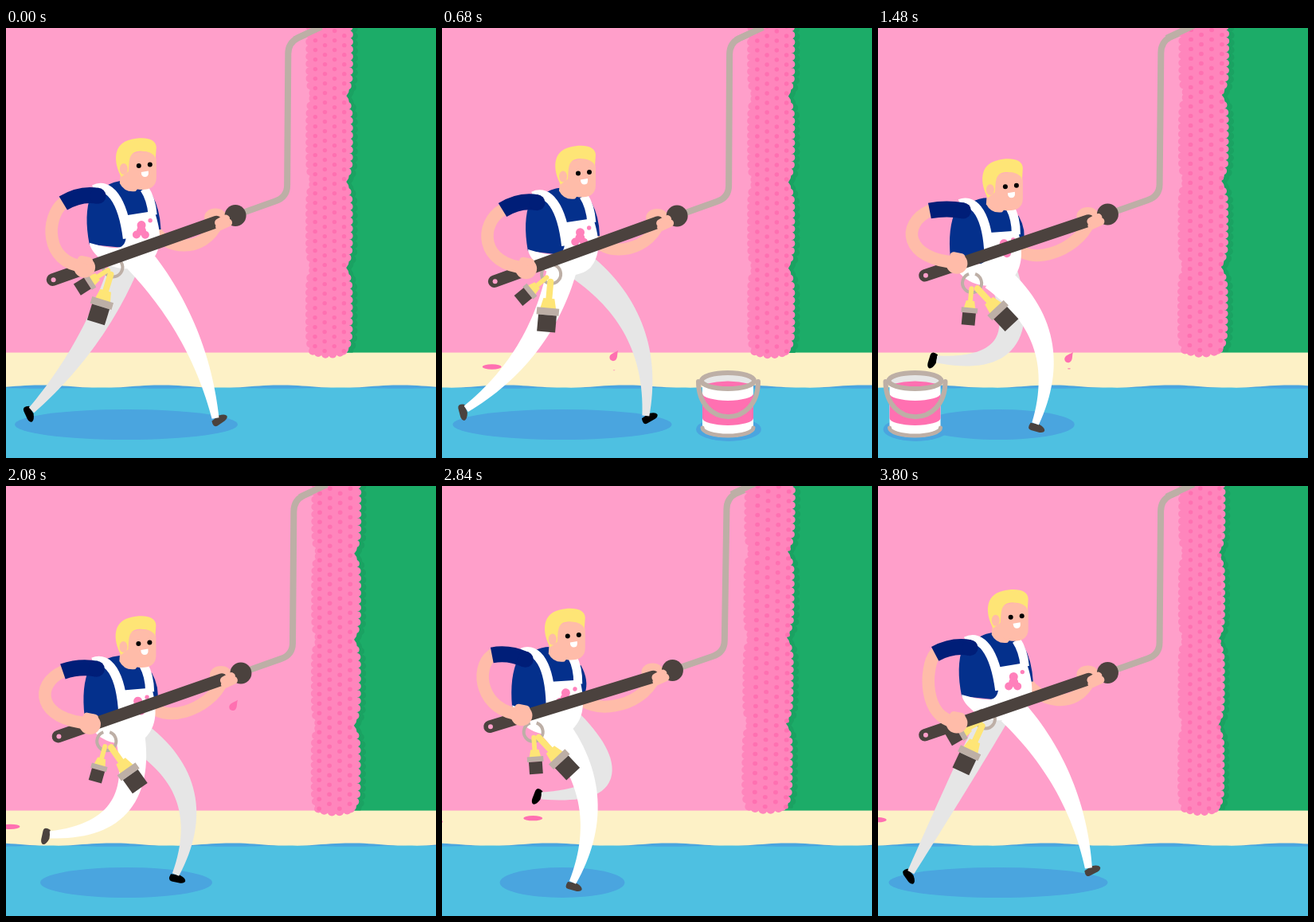
An HTML page with a canvas that plays this animation: 540 by 540 pixels, repeating every 3.84 s.

```html
<!DOCTYPE html>
<html lang="en">
<head>
<meta charset="utf-8">
<title>Painter</title>
<style>
html, body { margin: 0; width: 100%; height: 100%; overflow: hidden; }
canvas { display: block; width: 540px; height: 540px; }
</style>
</head>
<body>
<canvas id="stage" width="540" height="540"></canvas>
<script>
const ctx = document.getElementById('stage').getContext('2d');
const LOOP = 3840, STRIDE = 1280, STEP = 640, FRAME = 40, SPEED = 1500 / LOOP, TAU = Math.PI * 2;
const C = {
  wall: '#ff9fca', green: '#1cac68', greenShade: '#1aa262', floor: '#fdf1c6',
  cloth: '#4ec0e1', shade: '#4aa5df', paint: '#ff70b1', roller: '#ff85bc', blob: '#ff80bb',
  skin: '#ffbca9', hair: '#fee576', navy: '#04308c', sleeve: '#001e78',
  dark: '#4b423e', metal: '#bdafa6', grey: '#e6e6e6', white: '#fff', black: '#000'
};

// Evenly spaced key points: ankle x, y and shoe angle over a stride; eye height over a step
const FOOT = [
  [263, 490, -40], [213, 496, 6], [148, 498, 10], [92, 496, 20],
  [32, 488, 60], [55, 438, 97], [150, 392, 100], [242, 437, 20]
];
const EYE = [[173], [191], [198], [197], [178], [160], [152], [158]];
// Paint drops: landing time and place
const DROPS = [[500, 133], [693, 211], [1490, 236], [2195, 241], [2600, 208], [3372, 166]];

const rad = deg => deg * Math.PI / 180;
const clamp = v => Math.max(0, Math.min(1, v));
const osc = (t, period, peak) => Math.cos(TAU * (t - peak) / period);

// Smooth closed curve through evenly spaced points, turn = 1 is once round
function around(points, turn) {
  const n = points.length, pos = turn % 1 * n, i = Math.floor(pos), u = pos - i;
  const [a, b, c, d] = [-1, 0, 1, 2].map(k => points[(i + k + n) % n]);
  return b.map((v, j) => v + u / 2 * (c[j] - a[j] +
    u * (2 * a[j] - 5 * v + 4 * c[j] - d[j] + u * (3 * (v - c[j]) + d[j] - a[j]))));
}

function fill(d, color) {
  ctx.fillStyle = color;
  ctx.fill(new Path2D(d));
}
function line(d, color, width, cap = 'butt') {
  ctx.strokeStyle = color;
  ctx.lineWidth = width;
  ctx.lineCap = cap;
  ctx.lineJoin = 'round';
  ctx.stroke(new Path2D(d));
}
function oval(x, y, rx, color, ry = rx) {
  ctx.fillStyle = color;
  ctx.beginPath();
  ctx.ellipse(x, y, rx, ry, 0, 0, TAU);
  ctx.fill();
}
function rect(x, y, w, h, color) {
  ctx.fillStyle = color;
  ctx.fillRect(x, y, w, h);
}
function at(x, y, deg, draw) {
  ctx.save();
  ctx.translate(x, y);
  ctx.rotate(rad(deg));
  draw();
  ctx.restore();
}

function painterPose(t) {
  const tilt = 3.4 + 3 * osc(t, STEP, 270), drop = 74.5 + 8 * osc(t, STEP, 70);
  return {
    tilt, drop,
    x: 164 + 5 * osc(t, STEP, 0) + 2.5 * osc(t, STRIDE, 740),
    y: around(EYE, t / STEP)[0],
    tipX: 291.5 + 3.7 * osc(t, STRIDE, 720),
    tipY: 230 + (drop - 67) * 0.4,
    sleeveY: 35 + 12 * osc(t, STEP, 0),
    hipSpread: 3 + 15 * osc(t, STRIDE, 480),
    bigBrush: -9 + 37 * osc(t, STEP, 560),
    smallBrush: 28 + 32 * osc(t, STEP, 600)
  };
}

function drawGround(t, seam) {
  rect(0, 0, 540, 540, C.wall);
  rect(seam, 0, 540, 408, C.green);
  rect(0, 407.6, 540, 133, C.floor);
  const wave = (color, base, amp) => {
    let d = 'M0 540';
    for (let x = 0; x <= 540; x += 6) d += `L${x} ${base - amp * osc(x + SPEED * t, 150, 195)}`;
    fill(d + 'L540 540Z', color);
  };
  wave(C.shade, 450.2, 1.8);
  wave(C.cloth, 452.2, -0.6);
  oval(151, 498, 108 + 32 * osc(t, STEP, 0), C.shade, 19);
}

function drawDrops(t) {
  DROPS.forEach(([land, landX], i) => {
    const x = landX - SPEED * (t - land), y = 423.5 + 6.5 * osc(i, 6, 1.2);
    const fall = (t - land) / 520 + 1, grow = clamp((t - land + 20) / 60);
    if (grow > 0) oval(x, y, 12 * grow, C.paint, 3.2 * grow);
    if (fall > 0 && fall < 1) {
      at(x, -20 + (y + 20) * fall ** 1.6, 35, () =>
        fill('M0 -9C1 -5 4.5 -2 4.5 2A4.5 4.5 0 0 1 -4.5 2C-4.5 -2 -1 -5 0 -9Z', C.paint));
    }
  });
}

function rollerShape() {
  const shape = new Path2D();
  const bump = (x, y) => {
    shape.moveTo(x + 5, y);
    shape.arc(x, y, 5, 0, TAU);
  };
  for (let top = -260; top < 100; top += 108) {
    shape.roundRect(93, top, 49, 111, 9);
    for (let i = 0; i <= 11; i++) {
      const u = i / 5.5 - 1, inset = 7 * u ** 6, y = top + 5 + 9.2 * i;
      bump(93 + inset * 0.6, y);
      bump(142 - inset, y);
    }
  }
  for (let x = 104; x < 135; x += 9) bump(x, 175 - Math.abs(x - 117) * 0.2);
  return shape;
}
const ROLLER = rollerShape();

function drawRoller(t, p) {
  at(p.tipX, p.tipY, (82 - p.drop) * 0.05, () => {
    line('M8 -3L50 -18Q65 -23 65 -38L66 -203Q66 -217 78 -223L125 -244', C.metal, 8);
    ctx.translate(88, 0);
    ctx.scale(1 + p.tilt * 0.014, 1);
    ctx.translate(-88, 0);
    ctx.save();
    ctx.beginPath();
    ctx.rect(118, -300, 60, 472);
    ctx.clip();
    ctx.translate(6, 2);
    ctx.fillStyle = C.greenShade;
    ctx.fill(ROLLER);
    ctx.restore();
    ctx.fillStyle = C.roller;
    ctx.fill(ROLLER);
    const shift = 1488 / LOOP * t % 24;
    for (let col = 0; col < 8; col++) {
      const x = 88 + col * 12 - shift;
      if (x < 92 || x > 143) continue;
      for (let y = -250 + col % 2 * 6; y < 174; y += 12) oval(x, y, 2.7, C.paint);
    }
  });
  at(p.tipX, p.tipY, 0, () => line('M74 -221L78 -223L108 -237', C.metal, 8));
}

// The knee bows forward as hip and ankle come closer
function drawLeg(t, hipX, hipY, color, shoe, lift) {
  const [ax, footY, angle] = around(FOOT, t / STRIDE), ay = footY - lift;
  const dx = ax - hipX, dy = ay - hipY, dist = Math.hypot(dx, dy);
  const bow = 0.58 * Math.sqrt(Math.max(0, 228 ** 2 - dist ** 2)) / dist;
  const kx = (hipX + ax) / 2 + dy * bow, ky = (hipY + ay) / 2 - dx * bow;
  at(ax, ay, angle, () => fill('M-6 0L5 0Q13 3 13 7Q12 10 7 10L-4 9Q-10 8 -6 0Z', shoe));
  const left = [], right = [];
  for (let s = 0; s <= 1; s += 1 / 32) {
    const q = 1 - s;
    const x = q * q * hipX + 2 * q * s * kx + s * s * ax;
    const y = q * q * hipY + 2 * q * s * ky + s * s * ay;
    const vx = q * (kx - hipX) + s * (ax - kx), vy = q * (ky - hipY) + s * (ay - ky);
    const w = (18.5 - 14 * s ** 1.2) / Math.hypot(vx, vy);
    left.push([x - vy * w, y + vx * w]);
    right.unshift([x + vy * w, y - vx * w]);
  }
  fill('M' + left.concat(right).join('L') + 'Z', color);
}

function drawTorso() {
  fill('M-43 28C-30 18 -10 17 -2 24L12 32Q24 60 24 95L-16 104L-61 100C-66 75 -66 55 -60 38Z', C.navy);
  fill('M-61 98Q-40 104 -28 104Q-16 104 -15 90L-15 63L20 57C30 85 30 104 18 119C5 132 -25 134 -42 122C-55 112 -60 105 -61 98Z', C.white);
  line('M-56 31C-38 22 -20 42 -13 92', C.white, 12);
  line('M7 29Q16 42 18 62', C.white, 11);
  oval(4, 75, 5.5, C.blob);
  oval(-2, 87, 5, C.blob);
  oval(9, 87, 5, C.blob);
  oval(4, 82, 6, C.blob);
  oval(15, 69, 2.7, C.blob);
}

function drawHead() {
  fill('M-23 6L-24 22Q-18 34 -4 32L6 20Z', C.skin);
  fill('M-14 -12C0 -22 22 -18 22 -8L22 15C22 26 14 30 4 30C-8 30 -18 22 -18 8Z', C.skin);
  fill('M-22 14C-32 -4 -33 -28 -10 -33C5 -37 22 -35 22 -23L21 -9C20 -17 4 -20 -5 -17C-13 -14 -12 -4 -13 7Z', C.hair);
  oval(-19, 4, 5, C.skin, 7);
  oval(0, 0, 3, C.black);
  oval(14, -1.5, 3, C.black);
  fill('M3 8L12 6.5Q13 14 8 14Q3 14 3 8Z', C.white);
}

function drawBrush(angle, size) {
  at(0, 0, angle, () => {
    ctx.scale(size, size);
    line('M0 10L0 35', C.hair, 8, 'round');
    fill('M-7 31L7 31L10 44L-10 44Z', C.hair);
    rect(-14, 43, 28, 9, C.metal);
    rect(-11.5, 52, 23, 21, C.dark);
  });
}

function drawPole(p, endX, endY) {
  oval(p.tipX - 25, p.tipY + 2, 14, C.skin, 11);
  line(`M${endX} ${endY}L${p.tipX - 24} ${p.tipY + 8}`, C.dark, 15.5, 'round');
  oval(endX + 1, endY, 3, C.wall);
  oval(p.tipX, p.tipY, 13.5, C.dark);
  at(p.tipX, p.tipY, 0, () => line('M-20 14L-9 9M-21 9L-12 4', C.skin, 10, 'round'));
}

function drawNearArm(p, endX, endY, shoulder) {
  const sx = p.x - 95, sy = p.y + p.sleeveY, [px, py] = shoulder;
  const hx = endX + 40, hy = endY - p.drop * 0.17 - 3;
  const bend = 1.4 * (82 - Math.hypot(hx - sx, hy - sy));
  line(`M${sx + 6} ${sy - 2}L${sx} ${sy}C${sx - 24 - bend} ${sy + 16} ${hx - 54 - bend} ${hy - 4} ${hx} ${hy}`, C.skin, 15.5);
  line(`M${sx} ${sy}Q${(sx + px) / 2} ${Math.min(sy, py) - 4} ${px} ${py}`, C.sleeve, 20);
  oval(px, py, 10, C.sleeve);
  oval(hx, hy + 1, 13.5, C.skin, 13);
  line(`M${hx - 4} ${hy - 9}L${hx + 6} ${hy - 7}`, C.skin, 9, 'round');
}

function drawPainter(t, p) {
  const { x, y, tilt, hipSpread, tipX, tipY } = p;
  const endX = tipX - 229.5, endY = tipY + p.drop;
  const neckX = x - 22, neckY = y + 19 - tilt;
  const onTorso = (px, py) => {
    const s = Math.sin(rad(tilt)), c = Math.cos(rad(tilt)), dx = px + 22, dy = py - 19;
    return [neckX + dx * c - dy * s, neckY + dx * s + dy * c];
  };

  const fx = x + 20 - tilt, fy = y + 80 - tilt, gx = tipX - 22, gy = tipY + 8;
  line(`M${fx} ${fy}C${fx + 12} ${fy + 25} ${gx - 18} ${gy + 42} ${gx} ${gy}`, C.skin, 15);
  line(`M${x + 10} ${y + 40}Q${x + 19} ${y + 56} ${fx + 1} ${fy + 2 - tilt}`, C.navy, 15);

  const hipY = y + 118 - tilt;
  drawLeg(t + STEP, x - 8 + hipSpread, hipY, C.grey, C.black, 8);
  drawLeg(t, x - 8 - hipSpread, hipY, C.white, C.dark, 0);

  at(neckX, neckY, tilt, () => {
    ctx.translate(22, -19);
    drawTorso();
  });
  at(x, y, 0, drawHead);

  at(...onTorso(-31, 128), 0, () => {
    line('M-4 -11A12 12 0 1 0 4 -11', C.metal, 4);
    drawBrush(p.smallBrush, 0.73);
    drawBrush(p.bigBrush, 1);
  });
  drawPole(p, endX, endY);
  drawNearArm(p, endX, endY, onTorso(-51, 39));
}

function drawBucket(x) {
  oval(x + 1, 504, 41, C.shade, 15);
  at(x, 0, 0, () => {
    fill('M-32 444L-32 504A32 10 0 0 0 32 504L32 444Z', C.white);
    fill('M-32 459A32 9 0 0 0 32 459L32 490A32 9 0 0 1 -32 490Z', C.paint);
    line('M-32 502A32 10 0 0 0 32 502', C.metal, 5, 'round');
    oval(0, 443, 33, C.grey, 10);
    fill('M-28 447Q0 440 28 447Q18 453 0 453Q-18 453 -28 447Z', C.paint);
    line('M-33 443A33 10 0 1 1 33 443A33 10 0 1 1 -33 443Z', C.metal, 6);
    line('M-37 444C-37 503 38 503 38 444', C.metal, 6, 'round');
  });
}

function draw(t) {
  const p = painterPose(t);
  drawGround(t, p.tipX + 118);
  drawDrops(t);
  drawRoller(t, p);
  drawPainter(t, p);
  drawBucket(359 - SPEED * (t - 680));
}

function tick() {
  draw(Math.floor(performance.now() % LOOP / FRAME) * FRAME);
  requestAnimationFrame(tick);
}
tick();
</script>
</body>
</html>
```
